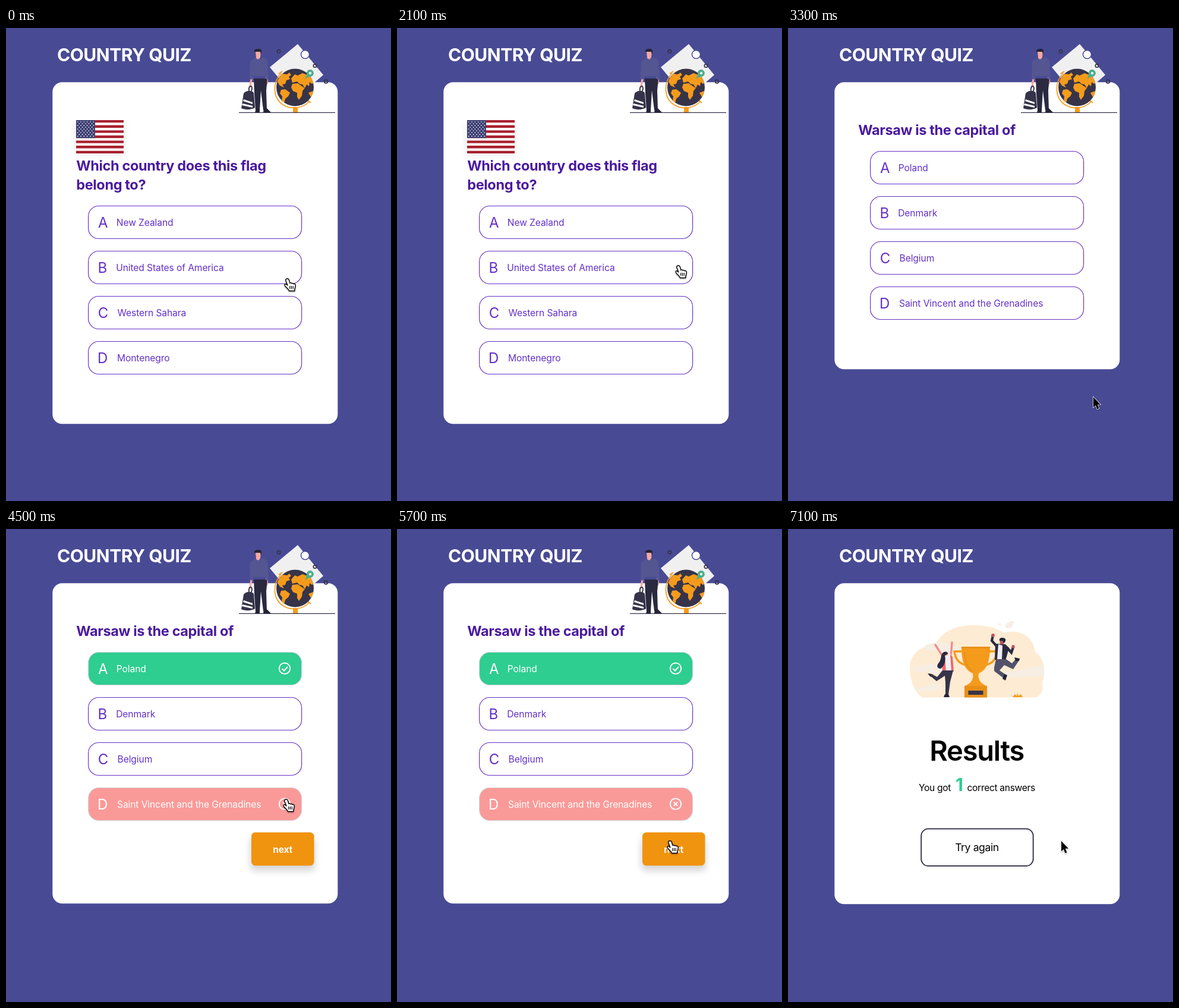
Write an HTML page that moves like this. It is 648x796 px and loops after 7200 ms.

```html
<!DOCTYPE html>
<html lang="en">
<head>
<meta charset="utf-8">
<title>Country quiz</title>
<style>
html, body { margin: 0; width: 100%; height: 100%; overflow: hidden; background: #484b94; }
svg { display: block; width: 648px; height: 796px; font-family: Inter, "Open Sans", sans-serif; }
.title { font: 700 30px Inter, sans-serif; letter-spacing: -.48px; fill: #fff; }
.ask { font: 700 23.5px Inter, sans-serif; letter-spacing: -.37px; fill: #4a1a9f; }
.key { font-size: 24px; }
.label { font-size: 15.6px; letter-spacing: -.1px; }
.next { font: 700 15.6px Inter, sans-serif; letter-spacing: -.3px; fill: #fff; }
.note { font-size: 15.6px; letter-spacing: -.33px; }
</style>
</head>
<body>
<svg viewBox="0 0 648 796">
  <defs>
    <filter id="soft" x="-30%" y="-40%" width="160%" height="200%"><feGaussianBlur stdDeviation="6"/></filter>
    <filter id="drop" x="-40%" y="-40%" width="190%" height="190%"><feDropShadow dx="0" dy="1.2" stdDeviation="1" flood-opacity=".35"/></filter>
    <clipPath id="ball"><circle cx="486.5" cy="100" r="31.5"/></clipPath>
    <clipPath id="ground"><rect x="200" y="140" width="240" height="143.5"/></clipPath>
  </defs>
  <rect width="648" height="796" fill="#484b94"/>
  <text class="title" x="86" y="56">COUNTRY QUIZ</text>
  <rect id="card" x="78.300" y="91.200" width="480" rx="16" fill="#fff"/>

  <g id="traveller">
    <path d="M491 27L534 79L488 119L444 66Z" fill="#f0f0f0"/>
    <circle cx="503.500" cy="44.500" r="7" fill="#fff" stroke="#484b94" stroke-width="1.500"/>
    <g fill="none" stroke="#35334a" stroke-width="1.700">
      <circle cx="459" cy="39.300" r="2.700"/><circle cx="520" cy="63.500" r="2.700"/><circle cx="538.500" cy="90" r="2.900"/>
    </g>
    <path d="M463 76C448 92 449 118 466 129C482 139 501 134 511 123" fill="none" stroke="#f59b1b" stroke-width="1.600"/>
    <path d="M459 77L465 73M508 122L513 126" stroke="#f59b1b" stroke-width="2"/>
    <path d="M483 133h8v9h-8z" fill="#f59b1b"/>
    <circle cx="486.500" cy="100" r="31.500" fill="#373449"/>
    <g clip-path="url(#ball)" fill="#f59b1b">
      <path d="M456 89L465 77L473 78L477 75L480 79L476 82L478 86L472 88L470 94L465 95L468 100L461 97Z"/>
      <path d="M463 104L470 103L478 109L475 115L470 119L468 127L464 123L465 115L461 110Z"/>
      <path d="M480 85L486 78L491 80L499 76L510 80L520 91L515 94L511 91L510 98L506 95L503 101L499 95L494 94L490 90L482 92Z"/>
      <path d="M482 94L491 93L498 98L503 101L499 106L498 114L493 121L490 116L490 109L483 106L480 100Z"/>
      <path d="M509 109L517 106L518 112L513 116Z"/>
    </g>
    <path d="M502 87C505 84 505 81 506 77A6 6 0 1 1 512 82C508 82 505 84 502 87Z" fill="#4bae8b"/>
    <circle cx="512" cy="76" r="2.200" fill="#f0f0f0"/>
    <path d="M412 82L415 84L412 101L409 100ZM437 82L441 83L441 94L437 96Z" fill="#f6a8a4"/>
    <path d="M417 85L440 85L438 105L439 138H433L429 105L427 139H420L418 110Z" fill="#2a2940"/>
    <path d="M419 142L421 136H427V142ZM433 142L434 135H439L446 142Z" fill="#252436"/>
    <path d="M420 49C425 53 429 53 433 49L440 55L442 86L438 87L437 81L416 81L414 87L410 85L411 57C412 54 417 54 420 49Z" fill="#545691"/>
    <path d="M420 39L429 39L428 49C426 54 422 53 421 50Z" fill="#f6a8a4"/>
    <path d="M418 40C417 36 421 35 426 35C431 36 431 40 429 44L428 40Z" fill="#252436"/>
    <path d="M409 106C408 100 410 97 413 98C415 101 414 105 412 107" fill="none" stroke="#2a2940" stroke-width="1.800"/>
    <path d="M400 110C404 105 413 104 417 109L419 134C413 138 402 138 396 135Z" fill="#35334a"/>
    <path d="M400 120L415 125L415 128L399 123ZM398 127L415 131L415 134L397 130Z" fill="#fff"/>
    <path d="M392 142.300H554" stroke="#373449" stroke-width="1.300"/>
  </g>

  <g id="flag">
    <rect x="116" y="160" width="84" height="54" fill="#000" opacity=".08" filter="url(#soft)"/>
    <rect x="118" y="155" width="80" height="56" fill="#fff"/>
    <path id="stripes" fill="#a9202f"/>
    <rect x="118" y="155" width="32" height="30.200" fill="#3d3f73"/>
    <g id="stars" fill="#fff"></g>
  </g>

  <g id="quiz">
    <text id="ask" class="ask"></text>
    <g id="rows"></g>
    <g id="next">
      <rect x="411" y="9" width="109" height="56" rx="7" opacity=".16" filter="url(#soft)"/>
      <rect x="413" width="105.500" height="56" rx="6.500" fill="#f0930f"/>
      <text class="next" x="465.600" y="34.500" text-anchor="middle">next</text>
    </g>
  </g>

  <g id="results">
    <g clip-path="url(#ground)">
      <path d="M226 283C213 275 205 253 205 235C205 211 223 195 247 197C258 171 285 161 315 162C335 162 351 167 364 175C389 166 414 182 416 207C432 216 435 246 427 258C431 270 426 281 416 284H226Z" fill="#fdebd3"/>
      <path d="M231 196C249 187 270 192 292 200L280 211C263 204 247 207 231 203ZM213 233L252 225L264 244L210 239ZM360 243L431 229V247L365 251ZM212 270L254 258L259 270L228 274Z" fill="#f6eee3"/>
      <path d="M366 165C366 158 372 155 380 155C380 163 375 168 368 167ZM353 162L357 157L359 163Z" fill="#f7eee8"/>
      <path d="M294 206H280C282 222 290 228 305 230M338 206H352C350 222 342 228 327 230" fill="none" stroke="#f59b1b" stroke-width="3.500"/>
      <path d="M292 198H340C340 225 334 237 321 243C319 251 323 260 334 264H298C309 260 313 251 311 243C298 237 292 225 292 198Z" fill="#f59b1b"/>
      <path d="M292 198H340V201H292ZM297 264H335V284H297Z" fill="#e98f18"/>
      <path d="M297 207C297 224 302 234 311 240" stroke="#e98f18" stroke-width="2" fill="none"/>
      <rect x="303.500" y="272" width="25" height="7" fill="#373449"/>
      <path d="M378 283L382 278L385 281L386 276L388 281L392 278L395 283Z" fill="#f59b1b"/>
      <path d="M260 214L248 195M274 216L276 191" stroke="#f38b8c" stroke-width="3.400" stroke-linecap="round"/>
      <path d="M261 212L275 211L277 239L261 239Z" fill="#f2f0f4"/>
      <path d="M259 212L264 211L266 241L260 241ZM273 211L277 215L279 240L275 240Z" fill="#ee666b"/>
      <circle cx="266" cy="210" r="3.600" fill="#f6a8a4"/>
      <path d="M260 209C263 205 269 206 269 210L264 213C266 222 263 231 257 235C250 235 250 229 254 225C258 220 257 213 260 209Z" fill="#2a2940"/>
      <path d="M260 238H278L273 257L270 279H265L265 258L264 247L250 256L239 247L242 244L251 249Z" fill="#373449"/>
      <path d="M235 243L242 244L240 249ZM264 278H270L272 283H262Z" fill="#252436"/>
      <path d="M351 197L343 188L345 179M369 200L376 208L379 199" fill="none" stroke="#2a2940" stroke-width="4.200"/>
      <circle cx="345" cy="179" r="2.900" fill="#b9545c"/><circle cx="379" cy="198" r="2.700" fill="#b9545c"/>
      <path d="M349 193L366 194L372 200L366 222L348 220Z" fill="#2a2940"/>
      <path d="M354 194L361 196L360 220L352 219Z" fill="#eeedf4"/>
      <path d="M356 184H365L363 194L357 194Z" fill="#b9545c"/>
      <path d="M356 188C355 183 360 182 365 184C368 187 365 191 363 192L361 188Z" fill="#252436"/>
      <path d="M350 219H367L377 226L384 218L389 221L379 236L364 229L356 238L368 246L364 252L347 239L347 233Z" fill="#53526b"/>
      <path d="M381 216L390 218L389 222L383 222ZM364 244L369 246L366 255L361 252Z" fill="#252436"/>
    </g>
    <text x="238.300" y="390" font-size="47" font-weight="600" letter-spacing="-1.250">Results</text>
    <text class="note" x="220" y="440.700">You got</text>
    <text x="282" y="441" font-size="30" font-weight="700" fill="#2ecd90">1</text>
    <text class="note" x="301.500" y="440.700">correct answers</text>
    <rect x="224.200" y="504.600" width="188.500" height="62.500" rx="12" fill="none" stroke="#3b3b52" stroke-width="2"/>
    <text x="318" y="542" font-size="17.600" letter-spacing="-.4" text-anchor="middle">Try again</text>
  </g>

  <g id="cursor" filter="url(#drop)">
    <path id="arrow" d="M0 0V17.500L3.800 13.900L6.500 20.500L9.500 19.300L6.800 12.700H12Z" stroke="#fff" stroke-width="1.300" paint-order="stroke"/>
    <g id="hand" transform="translate(-6 -1)" stroke="#000" stroke-width="1.400" stroke-linejoin="round">
      <path d="M4.500 1C6.500 .2 7.800 1.500 8.300 3L10 8.500C10.500 7.600 12.600 7.600 13 9C13.800 8.200 15.600 8.400 16 9.800C17 9.200 19 9.600 19.200 11.500C19.600 14.500 18 16.500 17.800 20V21.500H8.600C8 19 5 17 2.600 14.200C.8 12.200 .6 10.500 2 9.900C3.400 9.400 4.600 10.500 5.900 12L3 4.500C2.400 2.800 3 1.400 4.500 1Z" fill="#fff"/>
      <path d="M9.800 13V18M12.500 13V18M15.200 13V18" stroke-width="1.200"/>
    </g>
  </g>
</svg>
<script>
const $ = id => document.getElementById(id);
const LOOP = 7200, STEP = 100;

const first = { ask: ['Which country does this flag', 'belong to?'], askY: 240, top: 299, flag: true,
  names: ['New Zealand', 'United States of America', 'Western Sahara', 'Montenegro'] };
const second = { ask: ['Warsaw is the capital of'], askY: 180, top: 207,
  names: ['Poland', 'Denmark', 'Belgium', 'Saint Vincent and the Grenadines'] };

const scenes = [
  { at: 0, quiz: first, bottom: 666.3 },
  { at: 2300, quiz: first, bottom: 722.3, right: 1 },
  { at: 3300, quiz: second, bottom: 574.3 },
  { at: 4500, quiz: second, bottom: 630.3, right: 0, wrong: 3 },
  { at: 5800, bottom: 631.3 }
];

// Pointer tip: time, x, y
const path = [
  [0, 474, 422], [400, 572, 440], [800, 520, 430], [1500, 500, 420],
  [2100, 474, 400], [2300, 474, 400], [2700, 516, 626], [3200, 516, 626],
  [3300, 514, 621], [3500, 514, 621], [4300, 472, 455], [4700, 472, 455],
  [5100, 453, 496], [5400, 460, 525], [LOOP, 460, 525]
];

const show = (id, on) => $(id).setAttribute('display', on ? 'inline' : 'none');
const answered = s => s.right !== undefined;
const rowY = (quiz, i) => quiz.top + i * 76;

function drawFlag() {
  const h = 56 / 13;
  let d = '', dots = '';
  for (let i = 0; i < 13; i += 2) d += `M118 ${155 + i * h}h80v${h}h-80z`;
  for (let r = 0; r < 9; r++)
    for (let c = r % 2; c < 11; c += 2)
      dots += `<circle cx="${120.7 + c * 2.66}" cy="${158 + r * 3.02}" r=".85"/>`;
  $('stripes').setAttribute('d', d);
  $('stars').innerHTML = dots;
}

function row(scene, i) {
  const y = rowY(scene.quiz, i), good = scene.right === i, bad = scene.wrong === i;
  const marked = good || bad;
  const fill = good ? '#2ecd90' : bad ? '#fa9a98' : '#fff';
  const ink = marked ? '#fff' : '#6330c8';
  const mark = good ? 'M464.500 28L468 31.500L474 24.800' : 'M465.800 24.500L472.200 31M472.200 24.500L465.800 31';
  const icon = marked ? `<g fill="none" stroke="#fff" stroke-width="1.900">
    <circle cx="469" cy="27.700" r="9.200"/><path d="${mark}"/></g>` : '';
  return `<g transform="translate(0 ${y})" fill="${ink}">
    <rect x="138.600" y=".5" width="359" height="55" rx="17.500" fill="${fill}" stroke="${marked ? '#d3d3d8' : '#6631c6'}" stroke-width="1.150"/>
    <text class="key" x="${[155, 154.500, 154.700, 154][i]}" y="37">${'ABCD'[i]}</text>
    <text class="label" x="${[185.800, 185.200, 187.600, 187][i]}" y="34">${scene.quiz.names[i]}</text>${icon}</g>`;
}

function setScene(scene) {
  const quiz = scene.quiz;
  $('card').setAttribute('height', scene.bottom - 91.2);
  show('quiz', quiz);
  show('traveller', quiz);
  show('results', !quiz);
  show('flag', quiz && quiz.flag);
  if (!quiz) return;
  $('ask').innerHTML = quiz.ask.map((s, i) => `<tspan x="118.300" y="${quiz.askY + i * 32}">${s}</tspan>`).join('');
  $('rows').innerHTML = quiz.names.map((_, i) => row(scene, i)).join('');
  show('next', answered(scene));
  $('next').setAttribute('transform', `translate(0 ${quiz.top + 303.5})`);
}

function pointer(t) {
  const i = path.findIndex(p => p[0] > t);
  const [t0, x0, y0] = path[i - 1], [t1, x1, y1] = path[i];
  const u = (t - t0) / (t1 - t0), e = u * u * (3 - 2 * u);
  return [x0 + (x1 - x0) * e, y0 + (y1 - y0) * e];
}

function clickable(scene, x, y) {
  if (!scene.quiz) return false;
  const inside = (l, top, w) => x >= l && x <= l + w && y >= top && y <= top + 56;
  if (answered(scene)) return inside(413, scene.quiz.top + 303, 106) ||
    inside(138, rowY(scene.quiz, scene.wrong ?? scene.right), 360);
  return scene.quiz.names.some((_, i) => inside(138, rowY(scene.quiz, i), 360));
}

let current;
function render(ms) {
  const t = Math.floor(ms % LOOP / STEP) * STEP;
  const scene = scenes.filter(s => s.at <= t).pop();
  if (scene !== current) setScene(current = scene);
  const [x, y] = pointer(t), over = clickable(scene, x, y);
  $('cursor').setAttribute('transform', `translate(${x} ${y})`);
  show('hand', over);
  show('arrow', !over);
}

drawFlag();
render(0);
const start = performance.now();
(function tick() {
  render(performance.now() - start);
  requestAnimationFrame(tick);
})();
</script>
</body>
</html>
```
